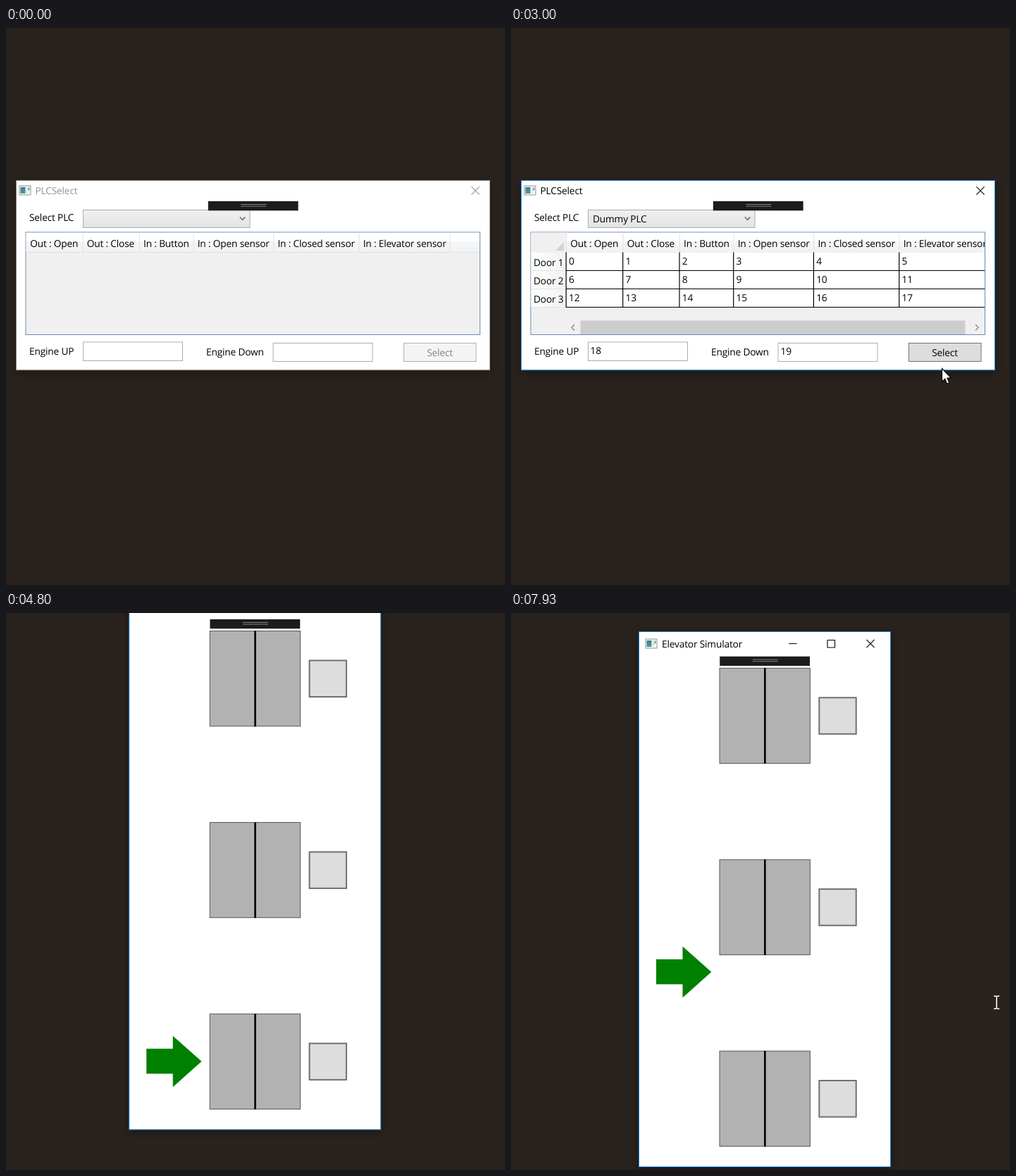
An HTML page for the animation above (8 s loop, 708 by 791 pixels).

```html
<!DOCTYPE html>
<html lang="en">
<head>
<meta charset="utf-8">
<title>Elevator Simulator</title>
<style>
html, body { margin: 0; width: 100%; height: 100%; overflow: hidden; background: #2a221d; }
svg { display: block; width: 708px; height: 791px; }
text {
  font: 13.7px "Open Sans", "Noto Sans", sans-serif; letter-spacing: -.012em;
  white-space: pre; text-rendering: geometricPrecision;
}
.shadow { filter: drop-shadow(0 4px 7px rgba(0, 0, 0, .35)); }
</style>
</head>
<body>
<svg id="stage" viewBox="0 0 708 791">
  <defs>
    <linearGradient id="combo" x2="0" y2="1"><stop stop-color="#f0f0f0"/><stop offset="1" stop-color="#e3e3e3"/></linearGradient>
    <linearGradient id="head" x2="0" y2="1"><stop offset=".42" stop-color="#fff"/><stop offset=".44" stop-color="#f6f7f9"/><stop offset="1" stop-color="#f0f1f3"/></linearGradient>
    <linearGradient id="side"><stop stop-color="#fff"/><stop offset="1" stop-color="#f1f2f4"/></linearGradient>
    <linearGradient id="teal" x2="0" y2="1"><stop stop-color="#3c7f9a"/><stop offset="1" stop-color="#4f9c80"/></linearGradient>
    <clipPath id="gridClip"><rect x="28.5" y="290.5" width="643.5" height="144.5"/></clipPath>
  </defs>
  <rect width="708" height="791" fill="#2a221d"/>
  <g id="win" class="shadow"></g>
  <g id="dlg" class="shadow"></g>
  <path id="arrowCur" d="M.5 .5V19.2L4.7 15.2L7.7 22.2L10.8 20.9L7.8 14.1H13.4Z" fill="#fff" stroke="#000" stroke-width="1.1"/>
  <path id="beamCur" d="M-4 -9H-1.2L0 -8L1.2 -9H4M0 -8V8M-4 9H-1.2L0 8L1.2 9H4" fill="none" stroke="#fff" stroke-width="1.6"/>
</svg>
<script>
const LOOP = 8000, FPS = 15;
const $ = id => document.getElementById(id);
const attrs = (el, a) => { for (const k in a) el.setAttribute(k, a[k]); };
const show = (el, on) => el.setAttribute('visibility', on ? 'inherit' : 'hidden');

const rect = (x, y, w, h, fill, stroke = 'none', more = '') =>
  `<rect x="${x}" y="${y}" width="${w}" height="${h}" fill="${fill}" stroke="${stroke}" ${more}/>`;
const path = (d, stroke, width = 1) =>
  `<path d="${d}" fill="none" stroke="${stroke}" stroke-width="${width}"/>`;
const text = (x, y, s, more = '') => `<text x="${x}" y="${y}" ${more}>${s}</text>`;

const appIcon = (x, y) =>
  rect(x + .5, y + .5, 16, 13, '#f4f6f7', '#8d9498') +
  rect(x + 2, y + 2.5, 7, 9, 'url(#teal)') +
  rect(x + 10.5, y + 2.5, 2, 9, '#dfe6ea') +
  rect(x + 13, y + 3, 1.8, 4, '#5b9a86');
const debugBar = (x, y) =>
  rect(x, y, 127.8, 13.3, '#1c1c1d') +
  path(`M${x + 46.5} ${y + 4.5}h36m-36 2.6h36`, '#808080');
const cross = (x, y) =>
  path(`M${x - 5.6} ${y - 5.6}l11.2 11.2m0 -11.2l-11.2 11.2`, '#000', 1.1);

// Settings dialog
const HEADS = ['Out : Open', 'Out : Close', 'In : Button', 'In : Open sensor', 'In : Closed sensor', 'In : Elevator sensor'];
const EDGES = [28.5, 109, 189.3, 266, 379.7, 501, 630];

function gridRows() {
  let s = rect(28, 290, 50, 28.5, '#f0f0f0') + path('M78.5 292V318', '#dfe1e5') +
    rect(28, 318.5, 50, 78, 'url(#side)') + rect(78, 318.5, 595, 78, '#fff');
  for (let r = 0; r < 3; r++) {
    const y = 344.5 + r * 26;
    s += text(32, y - 6.5, 'Door ' + (r + 1)) +
      path(`M28 ${y}H78`, '#e2e3e6') + path(`M78 ${y}H672`, '#000', 1.2);
    for (let c = 0; c < 6; c++) s += text(EDGES[c] + 53.5, y - 8.5, r * 6 + c);
  }
  for (let c = 0; c < 6; c++) s += path(`M${EDGES[c] + 49.7} 318.5V396.5`, '#000', 1.2);
  return s + '<path d="M75 304V316H63Z" fill="#d2d3d5"/>' +
    rect(98.5, 415.5, 546, 19.5, '#cdcdcd') +
    path('M90 421l-4 4.3l4 4.3M659 421l4 4.3l-4 4.3', '#909090', 1.5);
}

$('dlg').innerHTML =
  rect(14.5, 216.5, 672, 269.3, '#fff', '#8a8684', 'id="dlgEdge"') + appIcon(18.5, 223.5) +
  `<g id="dlgTitle">${text(41.5, 236, 'PLCSelect')}${cross(666, 231)}</g>` +
  text(33, 274, 'Select PLC') +
  rect(109.5, 258.5, 236.5, 25, 'url(#combo)', '#acacac', 'id="box"') +
  path('M331.8 268.6l3.8 3.8l3.8 -3.8', '#606060', 1.4) +
  text(116, 276, 'Dummy PLC', 'id="choice"') + debugBar(286.8, 246) +
  rect(28, 290, 644.5, 145.5, '#f0f0f0', '#688caf') +
  '<g clip-path="url(#gridClip)">' + rect(28, 290.5, 645, 28, 'url(#head)') +
  path('M28 318.5H673', '#e0e1e5') + '<g id="heads">' +
  HEADS.map((h, i) => text(EDGES[i] + 5.7, 311, h) + path(`M${EDGES[i + 1]} 292V318`, '#dfe1e5')).join('') +
  `</g><g id="rows">${gridRows()}</g></g>` +
  text(33, 464, 'Engine UP') + rect(109.5, 446, 141, 26.5, '#fff', '#abadb3') +
  text(284, 465, 'Engine Down') + rect(379, 447.5, 141, 26, '#fff', '#abadb3') +
  `<g id="engines">${text(112.5, 463, 18)}${text(382.5, 464, 19)}</g>` +
  rect(564.5, 447.5, 102.5, 26, '#f4f4f4', '#adb2b5', 'id="select"') +
  text(615.5, 466, 'Select', 'id="selectText" text-anchor="middle"') +
  `<g id="popup">${rect(109.5, 284, 236.5, 27, '#fff', '#acacac')}` +
  rect(111.5, 286, 232.5, 23, '#fff', 'none', 'id="item"') + text(116, 302, 'Dummy PLC') + '</g>';

// Elevator window, laid out at its final place
const FLOORS = [0, 1, 2].map(i => 78 + i * 271.9);
$('win').innerHTML =
  rect(181.5, 26.5, 357, 760, '#fff', '#1883d7') + appIcon(190.5, 36.5) +
  text(214, 49, 'Elevator Simulator') +
  path('M394 43.5h11.5M449 38.5h10.5v10.5h-10.5z', '#000', 1.1) + cross(510, 43.5) +
  '<g id="shaft">' + debugBar(296.2, 61.7) +
  FLOORS.map((y, i) =>
    rect(296, y + .3, 128.3, 135.2, '#b2b2b2', '#555') +
    path(`M360.3 ${y}v136`, '#000', 2.6) +
    rect(437.3, y + 42.2, 52.4, 51.6, '#ddd', '#707070', `id="call${i}" stroke-width="2"`)).join('') +
  '<path id="pointer" d="M206 -18H243.5V-36.3L284.3 0L243.5 36.3V17.5H206Z" fill="#008000"/></g>';

// Where the mouse arrives: [time, x, y]
const STOPS = [
  [0, 716, 812], [200, 633, 658], [1333, 195, 289], [1800, 198, 275], [2200, 200, 297],
  [3000, 611, 483], [3267, 615, 472], [4333, 352, -30], [5000, 360, 43], [6267, 462, 150],
  [6600, 454, 177], [7333, 458, 610], [7600, 545, 718], [7933, 689, 553]];

const ramp = (t, from, length) => Math.min(1, Math.max(0, (t - from) / length));
const smooth = u => u * u * (3 - 2 * u);
const inside = (x, y, l, t, w, h) => x >= l && x <= l + w && y >= t && y <= t + h;
const zoom = (x, y, s) => `translate(${x} ${y}) scale(${s}) translate(${-x} ${-y})`;

// Longer ways take longer; the mouse rests in between
function mouse(t) {
  const i = STOPS.findIndex(s => s[0] > t);
  if (i < 0) return STOPS[STOPS.length - 1].slice(1);
  const [t0, x0, y0] = STOPS[i - 1], [t1, x1, y1] = STOPS[i];
  const travel = Math.min(t1 - t0, 120 + .7 * Math.hypot(x1 - x0, y1 - y0));
  const u = smooth(ramp(t, t1 - travel, travel));
  return [x0 + (x1 - x0) * u, y0 + (y1 - y0) * u];
}

// Window offset: one long drag, then a nudge
function drag(t) {
  const pull = ramp(t, 4757, 250), nudge = smooth(ramp(t, 5267, 200));
  return [-10 + 9.3 * pull ** .6 + .7 * nudge, -56.5 + 47.5 * smooth(pull) + 9 * nudge];
}

function paintButton(el, hover, pressed) {
  attrs(el, {
    fill: pressed ? '#c4e5f6' : hover ? '#bee6fd' : '#ddd',
    stroke: pressed ? '#2c628b' : hover ? '#3c7fb1' : '#707070'
  });
}

function drawDialog(t, x, y) {
  const gone = ramp(t, 3333, 214);
  show($('dlg'), gone < 1);
  attrs($('dlg'), { opacity: 1 - gone, transform: zoom(349.8, 350, 1 - .048 * gone) });
  const active = t >= 1930, ready = t >= 2460, open = t >= 1990 && t < 2320;
  $('dlgEdge').setAttribute('stroke', active ? '#1883d7' : '#8a8684');
  $('dlgTitle').setAttribute('opacity', active ? 1 : .42);
  const over = open || inside(x, y, 109, 258, 237, 25) && t < 2320;
  attrs($('box'), { fill: over ? '#e4f0fc' : 'url(#combo)', stroke: over ? '#7eb4ea' : '#acacac' });
  show($('popup'), open);
  $('item').setAttribute('fill', y > 286 ? '#cbe8f6' : '#fff');
  for (const id of ['choice', 'rows', 'engines']) show($(id), ready);
  $('heads').setAttribute('transform', `translate(${ready ? 50 : 0} 0)`);
  if (ready) paintButton($('select'), t < 3400 && inside(x, y, 564, 447, 103, 27), t > 3320 && t < 3400);
  else attrs($('select'), { fill: '#f4f4f4', stroke: '#adb2b5' });
  $('selectText').setAttribute('fill', ready ? '#000' : '#838383');
}

function drawWindow(t, x, y, dx, dy) {
  const born = ramp(t, 3400, 265), shrink = .1 * (1 - born) ** 2;
  show($('win'), born > 0);
  attrs($('win'), {
    opacity: born,
    transform: `translate(${dx} ${dy - shrink * 100}) ` + zoom(360, 406.5, 1 - shrink)
  });
  show($('shaft'), t >= 3590);
  FLOORS.forEach((f, i) => {
    const hover = t > 5500 && inside(x, y, 437, f + 42, 53, 52);
    paintButton($('call' + i), hover, hover && t > 6260 && t < 6390);
  });
  const rise = Math.max(0, t - 6393) * .1167;
  $('pointer').setAttribute('transform', `translate(0 ${689.6 - rise})`);
}

function draw(ms) {
  const t = Math.floor((ms + 4) * FPS / 1000) * 1000 / FPS;
  const [x, y] = mouse(t), [dx, dy] = drag(t);
  drawDialog(t, x, y);
  drawWindow(t, x, y, dx, dy);
  const onWindow = t < 3390 ? inside(x, y, 14, 216, 673, 270)
    : t > 3600 && inside(x, y, 181 + dx, 26 + dy, 358, 761);
  show($('arrowCur'), onWindow);
  show($('beamCur'), !onWindow);
  for (const id of ['arrowCur', 'beamCur']) $(id).setAttribute('transform', `translate(${x} ${y})`);
}

const start = performance.now();
function tick() {
  draw((performance.now() - start) % LOOP);
  requestAnimationFrame(tick);
}
tick();
</script>
</body>
</html>
```
